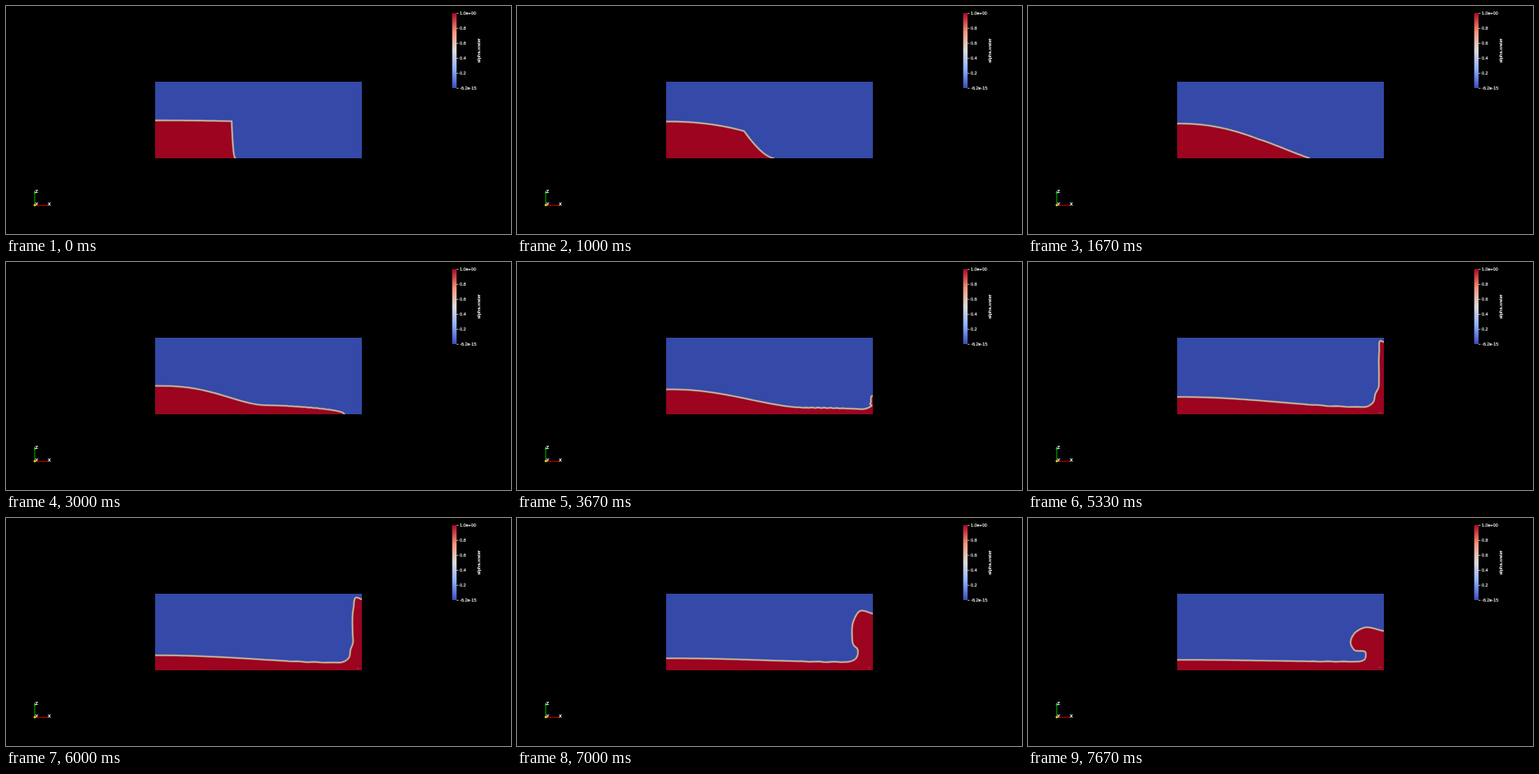
An HTML page that plays this animation: 640 by 289 pixels, repeating every 8 s.

```html
<!DOCTYPE html>
<html lang="en">
<head>
<meta charset="utf-8">
<title>Dam break</title>
<style>
  html, body { margin: 0; width: 100%; height: 100%; overflow: hidden; background: #000; }
  svg { display: block; width: 100vw; height: 100vh; }
  text { font-family: "Liberation Sans", Arial, sans-serif; font-size: 5.7px; fill: #fff; stroke: #fff; stroke-width: .15; }
</style>
</head>
<body>
<svg viewBox="0 0 640 289">
  <defs>
    <clipPath id="tank"><rect x="189" y="96" width="262" height="97"/></clipPath>
    <linearGradient id="scale" x1="0" y1="1" x2="0" y2="0">
      <stop offset="0" stop-color="#3b4cc0"/>
      <stop offset=".25" stop-color="#8db0fe"/>
      <stop offset=".5" stop-color="#dddddd"/>
      <stop offset=".75" stop-color="#f4987a"/>
      <stop offset="1" stop-color="#b40426"/>
    </linearGradient>
  </defs>
  <rect width="640" height="289" fill="#000"/>

  <g clip-path="url(#tank)">
    <rect x="189" y="96" width="262" height="97" fill="#3449a8"/>
    <path id="water" fill="#9c041f"/>
    <g fill="none" stroke-linejoin="round">
      <path class="skin" stroke="#9a949c" stroke-width="2.8" stroke-opacity=".5"/>
      <path class="skin" stroke="#d0bb9c" stroke-width="1.5"/>
    </g>
    <ellipse id="bubble" cx="446" rx="1.8" ry="1.2" fill="#8a3a2c"/>
  </g>

  <rect x="565.5" y="9" width="5.5" height="95" fill="url(#scale)"/>
  <g id="legend"></g>
  <text transform="translate(600.5 72) rotate(-90)" style="font-size:6px">alpha.water</text>

  <path d="M36.5 252.5H54" stroke="#c00000"/>
  <path d="M36.5 252.5V236" stroke="#00a000"/>
  <path d="M35 237.5L36.5 233.5L38 237.5Z" fill="#00d020"/>
  <circle cx="36.5" cy="252.3" r="1.5" fill="#e8e000"/>
  <g font-weight="bold">
    <text x="37" y="237">Z</text>
    <text x="37" y="253">Y</text>
    <text x="53" y="253">X</text>
  </g>
</svg>
<script>
const LOOP = 8000, STEPS = 40;
const LEFT = 189, RIGHT = 451, FLOOR = 193;
const HIT = 3.37, PEAK = 5.55; // seconds: front meets the wall, jet is highest

const clamp = (v, lo = 0, hi = 1) => Math.min(hi, Math.max(lo, v));
const mix = (a, b, u) => a + (b - a) * u;
const ease = u => u * u * (3 - 2 * u);
const decay = (h, t, tau, p) => h / (1 + (t / tau) ** p);
const range = fn => Array.from({ length: STEPS + 1 }, (_, i) => fn(i / STEPS));

// Surface points are [x, height above the floor]; t is in seconds.

// Height as a share of the fall from the left wall to the old dam corner.
function shoulder(u, t) {
  return mix(u ** 2.2, ease(u ** mix(1.4, 1.1, clamp(t - 3))), clamp((t - 1.5) / 1.5));
}

// Thin layer running ahead of the corner, hollow first and bulging later.
function tongue(v, t) {
  return (1 - v ** (1 + 0.04 * t * t)) ** (3 * Math.exp(-0.6 * t));
}

function ripple(x, t) {
  const u = clamp((x - 348) / 72);
  return 0.4 * clamp(t - 2.5) * Math.sin(Math.PI * u) * Math.sin(0.8 * x - 4 * t);
}

// Water climbing the right wall, then curling over to the left.
function jet(start, t) {
  const s = t - HIT, base = start[1];
  const top = 94 - (t < PEAK ? 20 : 9) * (t - PEAK) ** 2;
  const curl = s ** 3;
  return smooth([
    start,
    [RIGHT - 5 - 4.4 * s, base + Math.min(0.07 * top, 6)],
    [RIGHT - 5.4 * s, base + Math.min(0.22 * top, 17)],
    [RIGHT - 3.5 - 0.43 * curl, base + Math.min(0.28 * top, 25)],
    [RIGHT - 2.5 - 0.5 * curl, Math.min(0.65 * top, 45)],
    [RIGHT - 2.5 - 0.45 * curl, 0.85 * top],
    [RIGHT - 1.5 - 0.31 * curl, top],
    [RIGHT, top - 0.9 * s]
  ]);
}

// Hermite curve with chord-length tangents, leaving the first point level.
function smooth(p) {
  const last = p.length - 1;
  const len = p.slice(1).map((q, i) => Math.hypot(q[0] - p[i][0], q[1] - p[i][1]));
  const slope = (i, c) => (p[i + 1][c] - p[i][c]) / len[i];
  const tangent = (i, c) => {
    if (i === 0) return 1 - c;
    if (i === last) return slope(last - 1, c);
    return (slope(i - 1, c) * len[i] + slope(i, c) * len[i - 1]) / (len[i - 1] + len[i]);
  };
  return p.slice(1).flatMap((q, i) => range(u => {
    const w = 1 - u;
    return [0, 1].map(c =>
      p[i][c] * w * w * (1 + 2 * u) + q[c] * u * u * (3 - 2 * u) +
      len[i] * (tangent(i, c) * u * w * w - tangent(i + 1, c) * u * u * w));
  }));
}

function surface(t) {
  const crest = decay(48, t, 4.94, 2.2);
  const front = 291.5 + 34.5 * t ** 1.26;
  const end = t < HIT ? front : RIGHT - 13 - 6 * (t - HIT);
  const cornerX = Math.min(286 + 1.65 * t ** 3, end);
  const cornerH = Math.max(decay(47, t, 1.68, 1.95), 8.2 + 0.75 * (t - 4));

  const back = range(u => [mix(LEFT, cornerX, u), mix(crest, cornerH, shoulder(u, t))]);
  const ahead = range(u => {
    const x = mix(cornerX, end, u);
    return [x, cornerH * tongue((x - cornerX) / (front - cornerX), t)];
  });
  const low = [...back, ...ahead].map(([x, h]) => [x, h + ripple(x, t)]);
  return t < HIT ? low : [...low, ...jet(low[low.length - 1], t)];
}

const water = document.getElementById("water");
const skins = document.querySelectorAll(".skin");
const bubble = document.getElementById("bubble");

function draw(t) {
  const points = surface(t);
  const line = "M" + points.map(([x, h]) => `${x.toFixed(2)} ${(FLOOR - h).toFixed(2)}`).join("L");
  water.setAttribute("d", `${line}V${FLOOR}H${LEFT}Z`);
  skins.forEach(s => s.setAttribute("d", line));
  bubble.setAttribute("cy", mix(192, 189.3, clamp((t - 4.3) / 3.3)));
  bubble.setAttribute("opacity", t < 4.3 ? 0 : 0.8);
}

document.getElementById("legend").innerHTML =
  ["1.0e+00", "0.8", "0.6", "0.4", "0.2", "-6.2e-15"].map((label, i) => {
    const y = 9.3 + i * 19;
    return `<path d="M571 ${y}h2.5" stroke="#fff" stroke-width=".7"/><text x="575" y="${y + 1.8}">${label}</text>`;
  }).join("");

// The simulation output advances three times a second.
const start = performance.now();
function tick(now) {
  const t = Math.max(0, now - start) % LOOP;
  draw(Math.floor(t * 0.003 + 0.02) / 3);
  requestAnimationFrame(tick);
}
draw(0);
requestAnimationFrame(tick);
</script>
</body>
</html>
```
